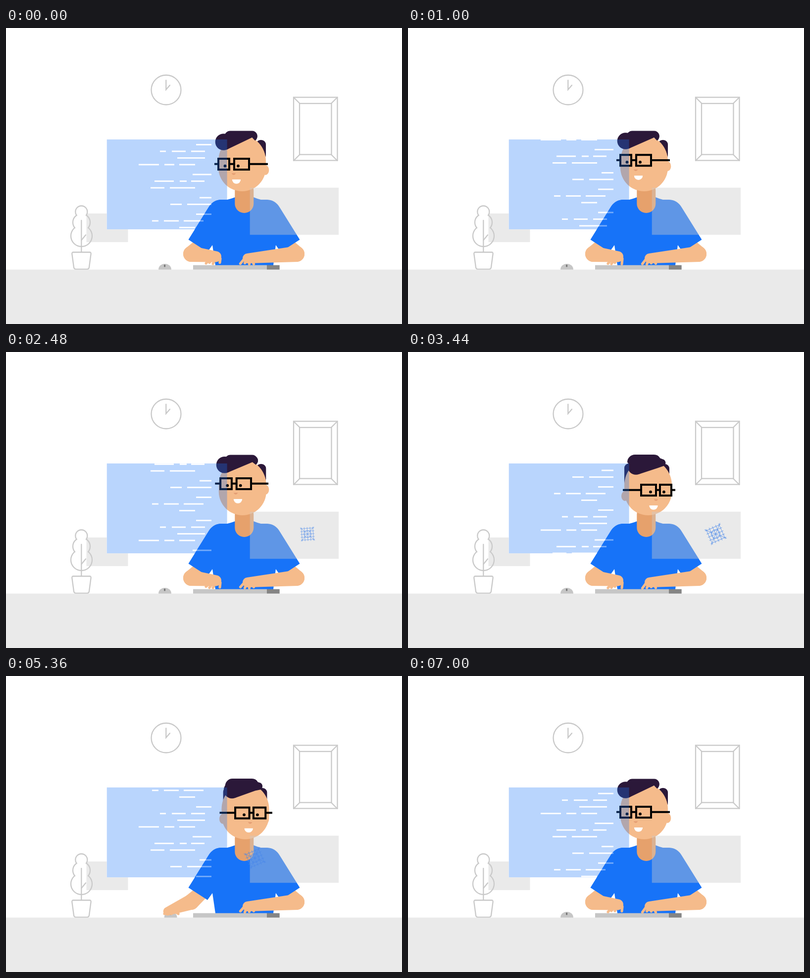
An HTML page with a canvas that plays this animation: 800x600 px, repeating every 7.04 s.

```html
<!DOCTYPE html>
<html>
<head>
<meta charset="utf-8">
<title>Working at a desk</title>
<style>
  html, body { margin: 0; width: 100%; height: 100%; overflow: hidden; background: #fff; }
  canvas { display: block; width: 800px; height: 600px; }
</style>
</head>
<body>
<canvas id="stage" width="800" height="600"></canvas>
<script>
const c = document.getElementById('stage').getContext('2d');
const LOOP = 7040, TAU = Math.PI * 2;
const BLUE = '#1773f8', SKIN = '#f5bb8b', NECK = '#e6a16c', HAIR = '#2b1839', GREY = '#c9c9c9';
const PANEL = [203.5, 225.7, 243.3, 182.5];

let t = 0; // time within the loop, in ms

const lerp = (a, b, p) => a + (b - a) * p;
const linear = (from, to) => Math.min(1, Math.max(0, (t - from) / (to - from)));
const smooth = (from, to) => {
  const p = linear(from, to);
  return p * p * (3 - 2 * p);
};
const cubic = (from, to) => {
  const p = linear(from, to);
  return p < .5 ? 4 * p ** 3 : 1 - 4 * (1 - p) ** 3;
};

// Blocks of code; each row lists the start and end of its dashes.
const CODE = [
  [[384, 415], [311, 323, 335, 363, 374, 402], [346, 402], [268, 309, 320, 340, 350, 382]],
  [[377, 415], [300, 339, 351, 365, 374, 401], [292, 320, 331, 382]],
  [[391, 415], [332, 355, 366, 415]],
  [[384, 415], [295, 308, 319, 349, 359, 399], [350, 382]]
];
const ROW = 13.5, BLOCK_GAP = 20, CODE_HEIGHT = 188;

const shirt = new Path2D(`M368.5 429L409.5 363Q418 349 434 348L447 348Q455 346 463 343L500 343Q507 346 515 348
  L528 348Q544 349 552.5 363L593.5 429L555 454L545 440L540 481L423 481L417 440L407 454Z`);

function disc(x, y, rx, ry = rx) {
  c.beginPath();
  c.ellipse(x, y, rx, ry, 0, 0, TAU);
  c.fill();
}

function line(...p) {
  c.beginPath();
  for (let i = 0; i < p.length; i += 2) c.lineTo(p[i], p[i + 1]);
  c.stroke();
}

function rounded(x, y, w, h, r) {
  c.beginPath();
  c.roundRect(x, y, w, h, r);
  c.fill();
}

// Tapered stroke with round ends.
function limb(x1, y1, r1, x2, y2, r2) {
  const a = Math.atan2(y2 - y1, x2 - x1);
  c.beginPath();
  c.arc(x1, y1, r1, a + TAU / 4, a - TAU / 4);
  c.arc(x2, y2, r2, a - TAU / 4, a + TAU / 4);
  c.fill();
}

function room() {
  c.strokeStyle = GREY;
  c.lineWidth = 2.3;
  c.lineCap = 'round';
  c.beginPath();
  c.arc(323.5, 125.5, 30, 0, TAU);
  c.stroke();
  line(323.3, 106, 323.3, 125, 331, 116);

  c.lineJoin = 'miter';
  c.strokeRect(581, 140.5, 88.5, 128);
  c.strokeRect(593, 153, 64.5, 103.5);
  for (const sx of [-1, 1])
    for (const sy of [-1, 1])
      line(625.2 + sx * 32, 204.7 + sy * 52, 625.2 + sx * 44, 204.7 + sy * 64);

  // Plant: circles merged into one outline.
  const leaves = [[152.3, 372.5, 12], [152.5, 394, 17.5], [152.5, 421.5, 21.5]];
  for (const [grow, fill] of [[1.15, GREY], [-1.15, '#fff']]) {
    c.fillStyle = fill;
    for (const [x, y, r] of leaves) disc(x, y, r + grow);
  }
  line(152.3, 390, 152.3, 454);
  line(152.5, 430, 161, 419.5);
  c.stroke(new Path2D('M136 454.5H169Q172 454.5 171.6 458L168 485Q167.5 488.8 164 488.8H141Q137.5 488.8 137 485L133.3 458Q133 454.5 136 454.5Z'));

  c.fillStyle = '#eaeaea';
  c.fillRect(0, 489.7, 800, 111);
  c.fillStyle = 'rgba(202,202,202,.4)';
  c.fillRect(162.5, 376, 84, 58);
  c.fillStyle = '#fff';
  c.fillRect(...PANEL);
}

function mouse(x) {
  c.fillStyle = '#c6c6c6';
  c.beginPath();
  c.ellipse(x, 489.7, 13, 11.8, 0, Math.PI, TAU);
  c.fill();
  c.fillStyle = '#777';
  rounded(x - 2, 479.5, 3.2, 5, 1.5);
}

function finger(i, x, y, tipX, tipY, tap) {
  const lift = tap * (1 + Math.sin(t / 220 * TAU + i * 1.9));
  c.strokeStyle = SKIN;
  c.lineWidth = 5.2;
  c.lineCap = 'round';
  line(x, y, tipX, tipY - lift);
}

function body(mouseX) {
  const reach = smooth(3700, 4150) - smooth(6150, 6650);
  const mix = (a, b) => lerp(a, b, reach);
  const hx = mix(424, mouseX - 6.5), hy = mix(463.5, 477);

  c.fillStyle = SKIN;
  limb(398, 436, 14, 374, 458, 16);
  limb(564, 436, 14, 587, 458, 16);
  c.fillStyle = BLUE;
  c.fill(shirt);
  c.fillStyle = NECK;
  rounded(462.3, 310, 38, 65, 19);

  c.fillStyle = '#c6c6c6';
  c.fillRect(378, 480.7, 149, 9);
  c.fillStyle = '#858585';
  c.fillRect(527, 480.7, 25.7, 9);

  c.fillStyle = SKIN;
  limb(374, 458, 16, hx, hy, mix(11, 8.5));
  limb(587, 458, 16, 488, 467, 10);

  // Three fingers and, set apart, the thumb.
  for (const i of [0, 1, 2, 4])
    finger(i, hx + mix(5 * i - 11, 4 * i - 2), hy + mix(4, 0), hx + 7 * i - mix(20, 6), hy + mix(15, 5), 1.5 * (1 - reach));
  for (let i = 0; i < 4; i++)
    finger(i, 482 + 5 * i, 467 + i, 473.5 + 9 * i, 479, 1.3);
}

function hair(k, dy) {
  const mix = (a, b) => lerp(a, b, k);
  const lobeX = mix(439.5, 460.5), lobeY = 231 + dy / 4;
  c.fillStyle = HAIR;
  disc(lobeX, lobeY, 16.8);
  c.beginPath();
  c.moveTo(lobeX + 6.5, lobeY + 15.5);
  c.arc(mix(453, 458.5), mix(220, 223.5), mix(11.5, 15.5), -TAU / 2, -TAU / 4);
  c.arc(497, mix(219.5, 222), mix(11, 14), -TAU / 4, -.5);
  c.arc(mix(497.5, 513), mix(219.5, 224.5), mix(10.5, 7.5), -1, 1);
  c.lineTo(mix(497, 505), mix(222, 235));
  c.fill();
}

function head(k, y) {
  const mix = (a, b) => lerp(a, b, k);
  c.fillStyle = HAIR;
  rounded(mix(505, 508), 227, 20, mix(40, 30), 9);
  rounded(mix(446, 437), 226, 20, 46, 9);

  c.fillStyle = SKIN;
  for (const ear of [438, 524.3]) disc(ear, y + 12, 7, 10);
  const x = mix(477, 485);
  c.beginPath();
  c.ellipse(x, 270, 48, 52, 0, Math.PI, TAU);
  c.ellipse(x, 283, 48, 48, 0, 0, Math.PI);
  c.fill();
  hair(k, y - 276);

  const nose = mix(460, 501);
  c.fillStyle = '#e39c72';
  c.beginPath();
  c.moveTo(nose - 4.5, y + 18.5);
  c.lineTo(nose + 4.5, y + 18.5);
  c.quadraticCurveTo(nose, y + 25, nose - 4.5, y + 18.5);
  c.fill();

  c.fillStyle = '#fff';
  c.beginPath();
  c.arc(mix(465.5, 496), y + 31, 8.7, 0, Math.PI);
  c.fill();

  c.fillStyle = c.strokeStyle = '#000';
  disc(mix(442.5, 490), y + 3.7, 2.9);
  disc(mix(469, 517), y + 3.7, 2.9);
  c.lineWidth = 4;
  c.lineCap = 'butt';
  c.lineJoin = 'miter';
  const ax = mix(429, 471), aw = mix(22, 30), bx = mix(461, 509), bw = mix(30, 23);
  c.strokeRect(ax, y - 11, aw, 22);
  c.strokeRect(bx, y - 11, bw, 22);
  line(mix(421, 434), y - .3, ax, y - .3);
  line(ax + aw, y - .3, bx, y - .3);
  line(bx + bw, y - .3, mix(529, 540), y - .3);
}

function codeLines() {
  const scroll = 50.5 * linear(0, 1000) + 53.5 * linear(1000, 3440) + 73.5 * linear(3440, 6000) + 10.5 * linear(6800, LOOP);
  c.fillStyle = '#fff';
  for (const top of [236.5, 236.5 + CODE_HEIGHT]) {
    let y = top - scroll;
    for (const block of CODE) {
      for (const row of block) {
        for (let i = 0; i < row.length; i += 2) c.fillRect(row[i], y - 1.4, row[i + 1] - row[i], 2.8);
        y += ROW;
      }
      y += BLOCK_GAP - ROW;
    }
  }
}

function panels() {
  c.fillStyle = 'rgba(202,202,202,.4)';
  c.fillRect(492.7, 323.7, 179.3, 95.5);

  c.save();
  c.beginPath();
  c.rect(...PANEL);
  c.clip();
  c.fillStyle = 'rgba(23,115,248,.3)';
  c.fillRect(...PANEL);
  codeLines();
  // Code fades where it passes over the shirt.
  c.fillStyle = BLUE;
  c.fill(shirt);
  c.clip(shirt);
  c.globalAlpha = .4;
  codeLines();
  c.restore();
}

function icon() {
  const grow = smooth(2200, 2650);
  const size = Math.sqrt(grow) * (1 - smooth(6340, 6720));
  if (size < .01) return;
  const angle = -4 + 94 * smooth(2500, 3900) + 162 * linear(4420, 6700);
  c.save();
  c.translate(lerp(582.5, 621.5, grow) - 374.5 * cubic(4880, 6000), 369);
  c.rotate(angle * Math.PI / 180);
  c.scale(size, size);
  c.strokeStyle = '#4a88ea';
  c.lineWidth = .7;
  c.lineCap = 'butt';
  for (const d of [-14, -7, 0, 7, 14]) {
    line(d, -17, d, 17);
    line(-17, d, 17, d);
  }
  line(-17, -17, 17, 17);
  line(17, -17, -17, 17);
  c.beginPath();
  c.arc(0, 0, 9, 0, TAU);
  c.stroke();
  c.restore();
}

function draw(now) {
  t = now % LOOP;
  const mouseX = 321 + 17 * (smooth(4180, 4520) - cubic(4880, 6000));
  const turn = smooth(2380, 2900) - smooth(5050, 6170);
  const gaze = 276 - 9 * smooth(0, 1300) + 13 * smooth(2480, 2900) - 8 * smooth(5000, 6000) + 4 * smooth(6000, 7000);
  c.fillStyle = '#fff';
  c.fillRect(0, 0, 800, 600);
  room();
  mouse(mouseX);
  body(mouseX);
  head(turn, gaze);
  panels();
  icon();
  requestAnimationFrame(() => draw(performance.now() - start));
}

const start = performance.now();
draw(0);
</script>
</body>
</html>
```
